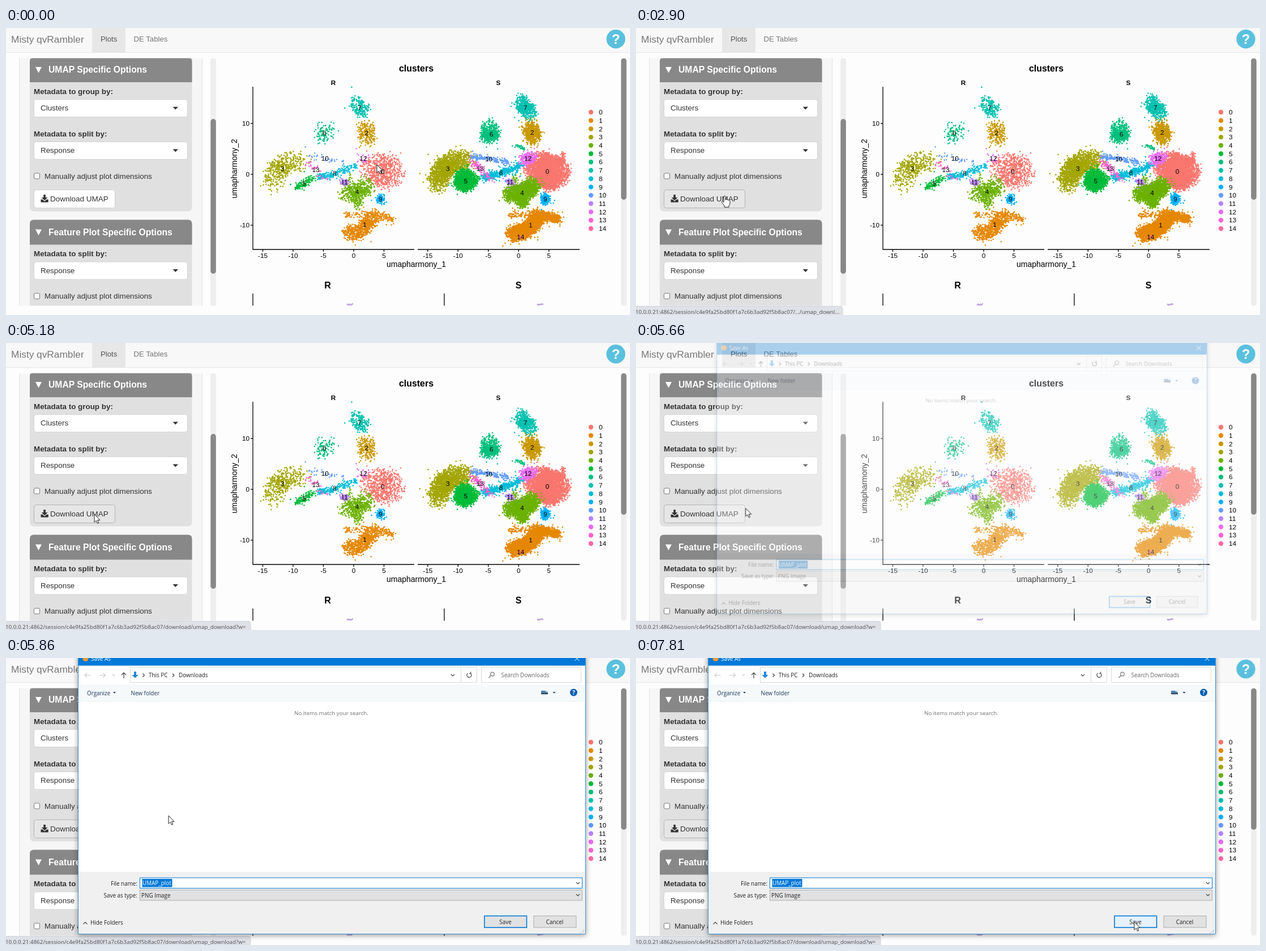
Write an HTML page with a canvas that moves like this. It is 1102 px wide and 508 px high and loops after 8 s.

```html
<!DOCTYPE html>
<html lang="en">
<head>
<meta charset="utf-8">
<title>Cluster plots</title>
<style>
html, body { margin: 0; width: 100%; height: 100%; overflow: hidden; background: #fdfdfd; }
canvas, svg { position: absolute; left: 0; top: 0; width: 1102px; height: 508px; }
svg { overflow: hidden; font: 13.4px "Liberation Sans", Arial, sans-serif; fill: #333; }
.bold { font-weight: 700; }
.head { font-weight: 700; font-size: 15.7px; fill: #fff; }
.nav { font-size: 13.2px; fill: #777; }
.field { fill: #fff; stroke: #d4d4d4; }
.box { fill: #fff; stroke: #767676; }
.plot { font-size: 11.8px; fill: #000; }
.mid { text-anchor: middle; }
.end { text-anchor: end; }
.line { fill: none; stroke: #000; stroke-width: 1.3; }
.ui { font: 9.9px "Open Sans", "Noto Sans", sans-serif; fill: #222; }
.thin { fill: none; stroke: #444; stroke-width: 1.2; }

/* One shared 8 s clock drives every part */
.clock { animation: 8s linear infinite; }
.step { animation-timing-function: step-end; }
#cursor { animation-name: move; animation-timing-function: ease-in-out; }
#arrow { animation-name: arrow; }
#hand { animation-name: hand; }
#button { animation-name: button; }
#status { animation-name: status; }
#bar { animation-name: bar; }
#short { animation-name: short; }
#full { animation-name: full; }
#dialog { transform-origin: 575px 222px; animation-name: open; }
#type { animation-name: type; }
#save { animation-name: save; }

@keyframes move {
  0%, 9.9% { transform: translate(655px, 242px); }
  20.4% { transform: translate(233px, 248px); }
  31.1%, 64.7% { transform: translate(157px, 297px); }
  64.75%, 66.3% { transform: translate(156px, 303px); animation-timing-function: ease-in; }
  71.6% { transform: translate(206px, 289px); animation-timing-function: linear; }
  73.25% { transform: translate(287px, 279px); }
  90.9%, 94.2% { transform: translate(881px, 464px); }
  95.25%, 100% { transform: translate(880px, 467px); }
}
@keyframes arrow { 0%, 64.75%, 100% { opacity: 1; } 28.4% { opacity: 0; } }
@keyframes hand { 0%, 64.75%, 100% { opacity: 0; } 28.4% { opacity: 1; } }
@keyframes button {
  0% { fill: #fff; stroke: #d0d0d0; }
  28.4%, 42.1%, 100% { fill: #e6e6e6; stroke: #b4b4b4; }
  40.35% { fill: #d4d4d4; stroke: #8c8c8c; }
}
@keyframes status { 0%, 33% { opacity: 0; } 34.5%, 100% { opacity: 1; } }
@keyframes bar { 0%, 42% { transform: translateX(-67px); } 48%, 100% { transform: none; } }
@keyframes short { 0% { opacity: 1; } 42.1%, 100% { opacity: 0; } }
@keyframes full { 0% { opacity: 0; } 42.1%, 100% { opacity: 1; } }
@keyframes open {
  0%, 70.4% { opacity: 0; transform: scale(.95); animation-timing-function: cubic-bezier(.2, .5, .4, 1); }
  73.1%, 100% { opacity: 1; transform: none; }
}
@keyframes type {
  0%, 85.75%, 100% { fill: #e1e1e1; stroke: #adadad; }
  84% { fill: #e5f1fb; stroke: #0078d7; }
}
@keyframes save { 0% { fill: #e1e1e1; } 88%, 100% { fill: #e5f1fb; } }
</style>
</head>
<body>
<canvas width="1102" height="508"></canvas>
<svg viewBox="0 0 1102 508">
  <defs>
    <clipPath id="view"><rect y="53.500" width="1102" height="438"/></clipPath>
    <g id="select">
      <rect class="field" x="49.500" y=".5" width="271" height="31" rx="4"/>
      <path d="M294.500 13.500h9.500l-4.700 5z"/>
    </g>
    <g id="check">
      <rect class="box" x="49.500" y=".5" width="10" height="10" rx="2"/>
      <text x="68" y="10">Manually adjust plot dimensions</text>
    </g>
    <path id="down" d="M-3-1.500L0 1.500 3-1.500"/>
  </defs>

  <rect width="1102" height="43.500" fill="#f8f8f8"/>
  <path d="M0 43.500H1102" stroke="#e7e7e7"/>
  <rect x="152" width="59" height="43" fill="#e7e7e7"/>
  <text x="9" y="25.500" font-size="17.300" fill="#777">Misty qvRambler</text>
  <text class="nav" x="167" y="24" style="fill:#555">Plots</text>
  <text class="nav" x="225.500" y="24">DE Tables</text>
  <circle cx="1077" cy="19.500" r="16.700" fill="#5bc0de"/>
  <text class="bold mid" x="1077" y="28" font-size="24" style="fill:#fff">?</text>

  <g clip-path="url(#view)">
    <rect x="23.500" y="40" width="323" height="480" fill="#f6f6f6" stroke="#e3e3e3"/>
    <rect x="42" y="40" width="286.500" height="284.500" rx="7" fill="#e0e0e0"/>
    <path d="M42 96V59q0-6 6-6H322.500q6 0 6 6V96z" fill="#888"/>
    <rect x="42" y="339.500" width="286.500" height="200" rx="7" fill="#e0e0e0"/>
    <path d="M42 383.500V346.500q0-7 7-7H321.500q7 0 7 7V383.500z" fill="#888"/>
    <path d="M52 69h11l-5.500 10.500zM52 356.500h11l-5.500 10.500z" fill="#fff"/>
    <text class="head" x="75" y="79">UMAP Specific Options</text>
    <text class="head" x="75" y="367">Feature Plot Specific Options</text>
    <text class="bold" x="49" y="117">Metadata to group by:</text>
    <text class="bold" x="49" y="192">Metadata to split by:</text>
    <text class="bold" x="49" y="404">Metadata to split by:</text>
    <use href="#select" y="126"/><text x="61" y="146">Clusters</text>
    <use href="#select" y="201"/><text x="61" y="221">Response</text>
    <use href="#select" y="413.500"/><text x="61" y="434">Response</text>
    <use href="#check" y="256.500"/>
    <use href="#check" y="469"/>
    <rect id="button" class="clock step" x="49.500" y="286.500" width="143" height="32" rx="4"/>
    <path d="M66.300 295h3.600v5h3.600l-5.400 5.200-5.400-5.200h3.600zM61.500 303.500h3l3.600 3.300 3.600-3.300h3v5H61.500z"/>
    <text x="78" y="306.500" font-size="13.500">Download UMAP</text>

    <rect x="361" y="53" width="10" height="450" rx="5" fill="#eee"/>
    <rect x="361.300" y="161" width="9.500" height="274" rx="4.700" fill="#888"/>
    <rect x="1086" y="53" width="10" height="439" rx="5" fill="#eee"/>
    <rect x="1086.200" y="53.500" width="9.500" height="250.500" rx="4.700" fill="#888"/>
  </g>

  <g class="plot">
    <text class="bold mid" x="724.500" y="77" font-size="15.900">clusters</text>
    <text class="bold mid" x="578" y="100.500">R</text>
    <text class="bold mid" x="869.500" y="100.500">S</text>
    <path class="line" d="M436 104V392H721M727 392H1013M436 470V491.500M774 470V491.500"/>
    <text class="mid" x="724.500" y="422.500" font-size="14">umapharmony_1</text>
    <text class="mid" font-size="14" transform="translate(408 249) rotate(-90)">umapharmony_2</text>
    <text class="bold mid" x="568" y="461" font-size="16">R</text>
    <text class="bold mid" x="905" y="461" font-size="16">S</text>
    <g id="marks"></g>
  </g>

  <g id="status" class="clock ui">
    <path id="bar" class="clock" d="M-2 492.500H428q4 0 4 4V510H-2z" fill="#dee1e6" stroke="#d0d4da"/>
    <g font-size="9.800" fill="#4a4e55">
      <text id="short" class="clock step" x="-1" y="505.500">10.0.0.21:4862/session/c4e9fa25bd80f1a7c6b3ad92f5b8ac07/.../umap_downl...</text>
      <text id="full" class="clock step" x="-1" y="505.500">10.0.0.21:4862/session/c4e9fa25bd80f1a7c6b3ad92f5b8ac07/download/umap_download?w=</text>
    </g>
  </g>

  <g id="dialog" class="clock ui">
    <rect x="127" y="-14" width="897" height="503" fill="#fff" style="filter:drop-shadow(0 2px 5px #0006)"/>
    <rect x="127" y="-14" width="897" height="27.500" fill="#0078d7"/>
    <circle cx="140.500" cy="1" r="5" fill="#f29a2e"/>
    <text x="150" y="5" fill="#fff">Save As</text>
    <path d="M1004.500-3l8 8m0-8l-8 8" stroke="#fff"/>

    <path class="thin" style="stroke:#ccc" d="M149.500 30.500H139m4-4l-4 4 4 4M165 30.500h10.500m-4-4l4 4-4 4M188 29l2 2 2-2"/>
    <path class="thin" d="M208 36V26m-4 4l4-4 4 4M241.500 27.500l3 3-3 3M294 27.500l3 3-3 3"/>
    <path fill="none" stroke="#d9d9d9" d="M219.500 16.500H831.500V43.500H219.500zM803.500 16.500V43.500M839.500 16.500H1015.500V43.500H839.500z"/>
    <path d="M226 24h4v6h3.500l-5.500 5.500-5.500-5.500h3.500z" fill="#1e88e5"/>
    <text x="252" y="34">This PC</text>
    <text x="305" y="34">Downloads</text>
    <use href="#down" class="thin" x="789" y="30.500"/>
    <path class="thin" d="M820.500 27.300a4 4 0 1 1-5-.2M820.800 24.500v3h-3"/>
    <circle class="thin" cx="859" cy="28.500" r="3.300" style="stroke:#777"/>
    <path class="thin" style="stroke:#777" d="M856.500 31l-4 4"/>
    <text x="874.500" y="34" fill="#666">Search Downloads</text>

    <rect x="128" y="47" width="895" height="29" fill="#f5f9fa"/>
    <path d="M128 76.500H1023" stroke="#e8eef0"/>
    <g fill="#1e395b">
      <text x="143" y="65.500">Organize</text>
      <path d="M189 60h5l-2.500 2.800zM965.500 60h5l-2.500 2.800z"/>
      <text x="220.500" y="65.500">New folder</text>
    </g>
    <rect x="945" y="57" width="12" height="9" fill="#d7e3ec"/>
    <path d="M945 58h6l6 3v2h-12z" fill="#4b83b5"/>
    <path d="M945 62h12v2h-12z" fill="#35434d"/>
    <circle cx="1002.500" cy="61" r="6.500" fill="#0a5fb4"/>
    <text class="mid bold" x="1002.500" y="64.500" fill="#fff">?</text>
    <text class="mid" x="574.500" y="101" fill="#6d6d6d" font-size="9.800">No items match your search.</text>

    <rect x="128" y="378.500" width="895" height="110" fill="#f0f0f0"/>
    <text class="end" x="232" y="402.500">File name:</text>
    <rect x="236.500" y="389" width="781" height="18.500" fill="#fff" stroke="#0078d7"/>
    <rect x="240.500" y="391" width="53" height="14.500" fill="#0078d7"/>
    <text x="241" y="402" fill="#fff">UMAP_plot</text>
    <text class="end" x="232" y="423.500">Save as type:</text>
    <rect id="type" class="clock step" x="236.500" y="410.500" width="781" height="18.500"/>
    <text x="239" y="423.500">PNG Image</text>
    <use href="#down" class="thin" x="1010" y="398.500"/>
    <use href="#down" class="thin" x="1010" y="419.500"/>
    <path class="thin" d="M136.500 471l3.500-3.500 3.500 3.500"/>
    <text x="149" y="472">Hide Folders</text>
    <rect id="save" class="clock step" x="845" y="456.500" width="74.500" height="20.500" stroke="#0078d7" stroke-width="1.600"/>
    <text class="mid" x="882" y="470.500">Save</text>
    <rect x="932" y="456.500" width="75" height="20.500" fill="#e1e1e1" stroke="#adadad"/>
    <text class="mid" x="969" y="470.500">Cancel</text>
    <path d="M1020 481v6m-3-3v3m-3-1v1" stroke="#aaa" stroke-width="1.500" stroke-dasharray="1.500"/>
    <path d="M127.500 0V488.500H1023.500V0" fill="none" stroke="#3c93d8"/>
  </g>

  <g id="cursor" class="clock" fill="#fff" stroke="#222">
    <path id="arrow" class="clock step" d="M0 0V14.300L3.400 11.300 5.600 16.300 7.800 15.300 5.600 10.500H10z"/>
    <path id="hand" class="clock step" d="M-2 2Q-2 0-.5 0T1 2V7.500Q1 6 2.500 6T4 7.500Q4.200 6.800 5.300 6.800T7 8.300Q7.200 7.700 8 7.800T9 9.500V13Q9 16 7 17.500V20H-1V17.500L-5.500 11.500Q-6 10-4.800 9.600T-2 11.500z"/>
  </g>
</svg>
<script>
const groups = 15;
const panels = [0, 291.3];  // x offset of R and S
const ctx = document.querySelector('canvas').getContext('2d');
const marks = document.getElementById('marks');
const add = html => marks.insertAdjacentHTML('beforeend', html);
const label = (x, y, text, type = 'mid') => add(`<text class="${type}" x="${x}" y="${y + 4.2}">${text}</text>`);

let seed = 20;
const rand = () => (seed = (seed * 1664525 + 1013904223) % 4294967296) / 4294967296;
const noise = () => rand() + rand() + rand() - 1.5;

// Evenly spaced hues on the CIE LUV wheel, lightness 65 and chroma 100
function hue(i) {
  const angle = (15 + 360 * i / groups) * Math.PI / 180;
  const u = 100 * Math.cos(angle) / (13 * 65) + .1978;
  const v = 100 * Math.sin(angle) / (13 * 65) + .4683;
  const y = ((65 + 16) / 116) ** 3;
  const x = 9 * y * u / (4 * v);
  const z = y * (12 - 3 * u - 20 * v) / (4 * v);
  return `color(xyz-d65 ${x} ${y} ${z})`;
}

// Point on the Bezier curve through any number of control points
function along(points, t) {
  if (points.length === 1) return points[0];
  const [a, b] = [along(points.slice(0, -1), t), along(points.slice(1), t)];
  return [a[0] + (b[0] - a[0]) * t, a[1] + (b[1] - a[1]) * t];
}

// Each group is a brush stroke of dots, with a count per panel
const sums = {};
function stroke(id, counts, radius, ...points) {
  ctx.fillStyle = hue(id);
  panels.forEach((shift, panel) => {
    const sum = sums[`${panel}:${id}`] ??= { id, x: 0, y: 0, n: 0 };
    ctx.beginPath();
    for (let k = 0; k < counts[panel]; k++) {
      const [cx, cy] = along(points, rand());
      const angle = rand() * 2 * Math.PI, r = radius * Math.sqrt(rand());
      const fuzz = rand() < .06 ? 14 : 4;
      const x = cx + shift + r * Math.cos(angle) + noise() * fuzz;
      const y = cy + r * Math.sin(angle) + noise() * fuzz;
      ctx.moveTo(x, y);
      ctx.arc(x, y, 1.3, 0, 7);
      sum.x += x;
      sum.y += y;
      sum.n++;
    }
    ctx.fill();
  });
}

stroke(0, [680, 3000], 28, [648, 246], [668, 253], [679, 257]);
stroke(0, [20, 300], 10, [655, 270], [670, 281]);
stroke(0, [8, 60], 4, [688, 238], [693, 222]);
stroke(1, [700, 2300], 13, [602, 364], [636, 362], [648, 331]);
stroke(1, [110, 500], 6, [655, 332], [684, 338]);
stroke(1, [45, 70], 5, [600, 331], [630, 329]);
stroke(2, [230, 560], 14, [631, 174], [644, 186], [637, 196]);
stroke(3, [420, 1600], 18, [470, 276], [474, 236], [522, 234]);
stroke(4, [430, 1600], 15, [598, 294], [625, 296], [640, 277]);
stroke(4, [60, 250], 8, [618, 305], [623, 312]);
stroke(4, [30, 40], 5, [608, 260], [608, 285]);
stroke(5, [130, 150], 5, [512, 284], [543, 265]);
stroke(5, [0, 1000], 18, [514, 270], [524, 268]);
stroke(6, [95, 330], 16, [564, 176], [562, 194]);
stroke(6, [0, 260], 7, [552, 191], [574, 189]);
stroke(6, [0, 30], 1, [606, 207], [625, 214]);
stroke(7, [200, 480], 13, [619, 128], [623, 142], [634, 150]);
stroke(8, [190, 460], 5, [552, 264], [575, 262], [618, 243]);
stroke(9, [110, 240], 6, [661, 298], [661, 308]);
stroke(10, [30, 180], 3, [532, 228], [560, 228], [598, 239]);
stroke(11, [60, 60], 4, [593, 273], [604, 273]);
stroke(12, [22, 240], 9, [622, 234], [640, 229]);
stroke(13, [30, 90], 5, [530, 238], [546, 246], [566, 270]);
stroke(14, [0, 4], 2, [618, 370]);

ctx.fillStyle = '#bfa3dd';
for (const x of [607, 943]) {
  for (let i = -4; i < 4; i++) ctx.fillRect(x + i * 1.3, 487 + rand() * 2, 2, 2.5);
}

for (const { id, x, y, n } of Object.values(sums)) {
  if (n) label(x / n, y / n, id);
}
for (let value = -10; value <= 10; value += 10) {
  const y = 259 - value * 9;
  add(`<path class="line" d="M432 ${y}h4"/>`);
  label(430, y, value, 'end');
}
for (let value = -15; value <= 5; value += 5) {
  for (const shift of panels) {
    const x = 614 + shift + value * 10.7;
    add(`<path class="line" d="M${x} 392v4"/>`);
    label(x, 402.8, value);
  }
}
for (let i = 0; i < groups; i++) {
  const y = 149 + i * 14.71;
  add(`<circle cx="1033" cy="${y}" r="4.200" style="fill:${hue(i)}"/>`);
  label(1047, y, i, 'start');
}
</script>
</body>
</html>
```
